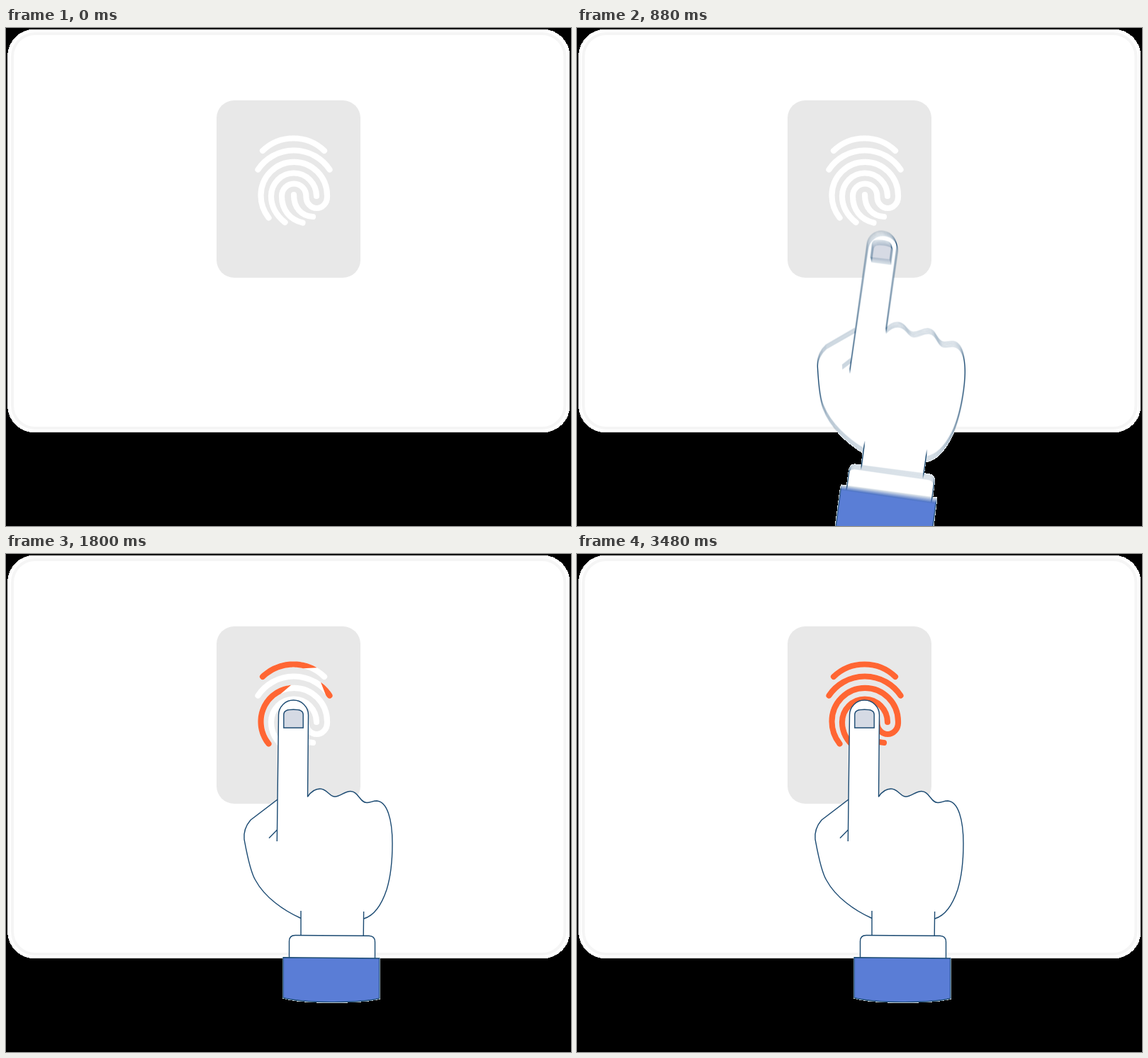
These frames come from a looping animation (797x702 px, 3680 ms). An HTML page with a canvas:

```html
<!DOCTYPE html>
<html lang="en">
<head>
<meta charset="utf-8">
<title>Fingerprint scan</title>
<style>
  html, body { margin: 0; width: 100%; height: 100%; overflow: hidden; background: #000; }
  canvas { display: block; }
</style>
</head>
<body>
<canvas id="stage" width="797" height="702"></canvas>
<script>
const W = 797, H = 702, LOOP = 3680, STEP = 40, LAST = 3480;
const NAVY = '#1b4a72', ORANGE = '#ff6633';

const layer = () => {
  const c = document.createElement('canvas');
  c.width = W;
  c.height = H;
  return c.getContext('2d', { willReadFrequently: true });
};
const out = document.getElementById('stage').getContext('2d');
const scene = layer();
const DEPTH = 4;
const blur = Array.from({ length: DEPTH + 1 }, layer);

// Ridges of the print: path, side of the leading edge, reveal start and end
const ridges = [
  ['M362 173A62.8 62.8 0 0 1 449 173', -1, 1288, 2040],
  ['M456.5 199.5A60.7 60.7 0 0 0 355.5 199.5', 1, 1740, 2350],
  ['M370.5 267.5C363 258 359.5 247.5 359.5 236A46.7 47.2 0 0 1 453 236V238A14.8 16 0 0 1 423.4 238V237' +
   'A17.2 17.5 0 0 0 389 237C389 256 400 270 418.5 274.5', -1, 1500, 2600],
  ['M438 237A32 32.5 0 0 0 374 237C374 252 381 264 393.5 274', 1, 1945, 3480],
  ['M406 235C406 253 416 265 433 266', 1, 2300, 3360]
].map(([d, side, from, to]) => {
  const box = document.createElement('div');
  box.innerHTML = `<svg><path d="${d}"/></svg>`;
  const el = box.querySelector('path');
  return { el, side, from, to, len: el.getTotalLength(), path: new Path2D(d) };
});

const palm = new Path2D('M416 513.5C392 503 365 484 352 460C344 447 339 418 336 402C335 391 339 382 345 375L382.5 346.5' +
  'L425.5 342C431 334 437 331 443 331C453 331 456 342 464 342C472 342 477 334.5 486 334.5C497 334.5 499 350.5 509 350.5' +
  'C514 350.5 517 348 523 348C538 349 545 375 545 408C545 440 541 460 537 473C529 497 518 510 505 514');
const finger = new Path2D('M382.3 405L384.5 227A21 21 0 0 1 426.5 227L425.5 342');
const knuckleGap = new Path2D('M383.6 346L425 341V350H383.6Z');
const crease = new Path2D('M371 400.5L382.3 389');
const nail = new Path2D('M391.8 245V226C392 221 396 219.3 405.5 219.3C415 219.3 419 221 419.2 226V245Z');
const wrist = new Path2D('M416 503V540H504.2L504.6 504');
const wristLine = new Path2D('M416 503V538M504.6 504L504.2 538.5');
const cuff = new Path2D('M399.5 570V546Q399.5 537.5 408 537.5L512 538.3Q520.5 538.5 520.5 547V570');
const sleeve = new Path2D('M391 568.7L526.8 570V626.5C500 633.5 418 633.5 391 625.5Z');

function shape(g, path, fill, line = path) {
  if (fill) {
    g.fillStyle = fill;
    g.fill(path);
  }
  if (line) g.stroke(line);
}

function drawHand(g, t) {
  const d = Math.max(0, 1530 - t);
  const q = (d * (0.00677 + 7e-11 * d * d)) ** 3;
  g.save();
  g.translate(441, 420 + q);
  g.rotate(0.098 * q ** 0.97 * Math.PI / 180);
  g.translate(-441, -420);
  g.strokeStyle = NAVY;
  g.lineWidth = 1.4;
  shape(g, palm, '#fff');
  shape(g, knuckleGap, '#fff', null);
  shape(g, wrist, '#fff', wristLine);
  shape(g, finger, '#fff');
  shape(g, crease);
  shape(g, nail, '#d5dae4');
  shape(g, cuff, '#fff');
  shape(g, sleeve, '#5a7dd6');
  g.restore();
}

// Average of the poses between two times, halving the span at each level
function blurHand(from, to, level = 0) {
  const g = blur[level], mid = (from + to) / 2;
  g.clearRect(0, 0, W, H);
  if (level === DEPTH) {
    drawHand(g, mid);
    return;
  }
  g.globalCompositeOperation = 'lighter';
  g.globalAlpha = 0.5;
  for (const [a, b] of [[from, mid], [mid, to]]) {
    blurHand(a, b, level + 1);
    g.drawImage(blur[level + 1].canvas, 0, 0);
  }
}

function drawMovingHand(g, t) {
  blurHand(t - 10, t + 10);
  g.drawImage(blur[0].canvas, 0, 0);
}

function edge(r, side, end) {
  const pts = [], limit = Math.max(0, Math.min(r.len, end));
  const n = Math.ceil(limit / 2) || 1;
  for (let i = 0; i <= n; i++) {
    const s = limit * i / n;
    const p = r.el.getPointAtLength(s);
    const a = r.el.getPointAtLength(Math.max(0, s - 0.3));
    const b = r.el.getPointAtLength(Math.min(r.len, s + 0.3));
    const k = 4.1 * side / Math.hypot(b.x - a.x, b.y - a.y);
    pts.push([p.x - (b.y - a.y) * k, p.y + (b.x - a.x) * k]);
  }
  return pts;
}

// Orange ridge with a slanted front that leads on one side
function drawReveal(g, r, t) {
  const p = (t - r.from) / (r.to - r.from);
  if (p <= 0) return;
  if (p >= 1) {
    g.strokeStyle = ORANGE;
    g.stroke(r.path);
    return;
  }
  const at = p * (r.len + 9);
  const lead = edge(r, r.side, at + 9);
  const trail = edge(r, -r.side, at - 9);
  const [a, b] = [lead[0], trail[0]];
  const angle = Math.atan2(a[1] - b[1], a[0] - b[0]);
  g.fillStyle = ORANGE;
  g.beginPath();
  lead.concat(trail.reverse()).forEach(pt => g.lineTo(...pt));
  g.arc((a[0] + b[0]) / 2, (a[1] + b[1]) / 2, 4.1, angle + Math.PI, angle, r.side > 0);
  g.fill();
}

function roundBox(g, x, y, w, h, r) {
  g.beginPath();
  g.roundRect(x, y, w, h, r);
}

function drawScene(t) {
  const g = scene;
  g.clearRect(0, 0, W, H);
  g.fillStyle = '#fff';
  roundBox(g, 2.5, 2, 792.5, 568, 38);
  g.fill();
  g.strokeStyle = '#f5f5f5';
  g.lineWidth = 4;
  roundBox(g, 9, 8, 779.5, 556, 32);
  g.stroke();
  g.fillStyle = '#e8e8e8';
  roundBox(g, 297, 102, 203, 250, 25);
  g.fill();

  g.lineCap = 'round';
  g.lineWidth = 8.2;
  g.strokeStyle = '#fff';
  ridges.forEach(r => g.stroke(r.path));
  ridges.forEach(r => drawReveal(g, r, t));
  g.lineCap = 'butt';

  if (t >= 400) (t < 1540 ? drawMovingHand : drawHand)(g, t);
}

// Hard cut-out edge: soft pixels blend with white, the rest is black
function present() {
  const img = scene.getImageData(0, 0, W, H), px = img.data;
  for (let i = 0; i < px.length; i += 4) {
    const a = px[i + 3];
    if (a === 255) continue;
    for (let c = i; c < i + 3; c++) {
      px[c] = a < 12 ? 0 : 255 + (px[c] - 255) * a / 255;
    }
    px[i + 3] = 255;
  }
  out.putImageData(img, 0, 0);
}

let shown = -1;
function tick() {
  const now = performance.now() % LOOP;
  const t = now < 400 ? 0 : Math.min(LAST, Math.floor(now / STEP) * STEP);
  if (t !== shown) {
    shown = t;
    drawScene(t);
    present();
  }
  requestAnimationFrame(tick);
}
tick();
</script>
</body>
</html>
```
